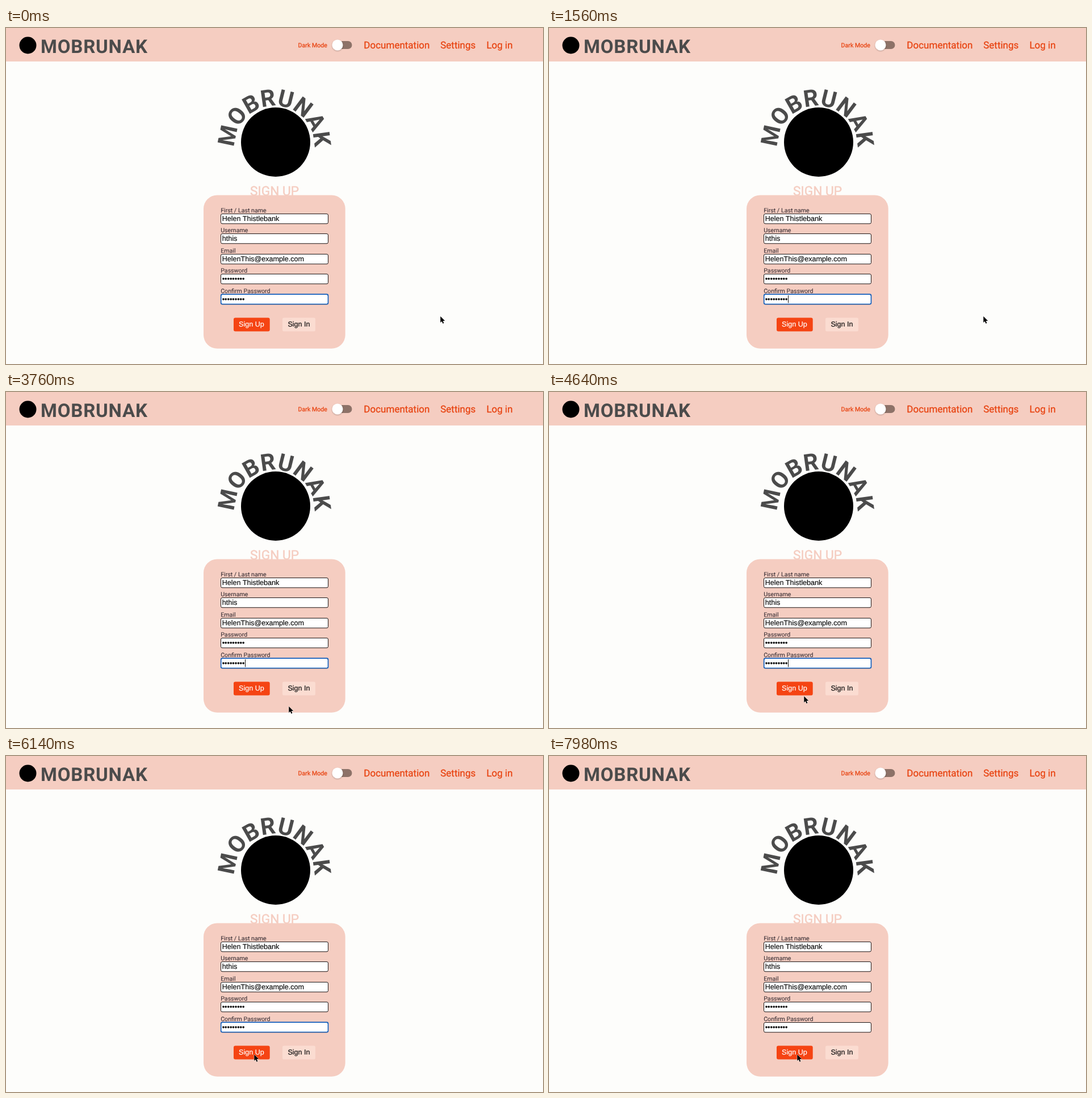
Recreate the animation shown at these times as an HTML page. Size 946x592 px, loop 8000 ms.

```html
<!DOCTYPE html>
<html lang="en">
<head>
<meta charset="utf-8">
<title>Sign up</title>
<style>
  html, body { margin: 0; width: 100%; height: 100%; overflow: hidden; background: #fdfdfb; }
  svg { display: block; width: 946px; height: 592px; font-family: Roboto, sans-serif; text-rendering: geometricPrecision; }
  .pink { fill: #f5cdc1; }
  .brand { fill: #4b4b4b; font-weight: 700; }
  .nav { fill: #e8420f; stroke: #e8420f; stroke-width: .25; font-size: 17.03px; }
  .small { font-size: 10.65px; }
  .title { stroke: #f5cdc1; stroke-width: .5; font-size: 22.7px; }
  .label { fill: #3a3036; stroke: #3a3036; stroke-width: .1; }
  .control { font: 12.6px "Liberation Sans", Arial, sans-serif; stroke-width: .2; }
  .dark { fill: #111; stroke: #111; }
  .light { fill: #fff; stroke: #fff; }
  .box { fill: #fff; stroke: #1c1616; }
</style>
</head>
<body>
<svg viewBox="0 0 946 592">
  <defs>
    <path id="arc" d="M473 277a70 70 0 1 1 .01 0"/>
    <filter id="shadow" x="-50%" y="-50%" width="200%" height="200%">
      <feDropShadow dx="0" dy="1" stdDeviation="1" flood-opacity=".3"/>
    </filter>
  </defs>

  <rect class="pink" width="946" height="59"/>
  <circle cx="38.5" cy="30.5" r="15"/>
  <text class="brand" x="61" y="43.5" font-size="33" letter-spacing=".8">MOBRUNAK</text>
  <text class="nav small" x="514.6" y="34">Dark Mode</text>
  <rect x="577" y="23" width="32.5" height="14" rx="7" fill="#8d7268"/>
  <circle cx="584" cy="30" r="9.5" fill="#fff" filter="url(#shadow)"/>
  <text class="nav" x="630.3" y="35.8">Documentation</text>
  <text class="nav" x="765.2" y="35.8">Settings</text>
  <text class="nav" x="846.4" y="35.8">Log in</text>

  <circle cx="475" cy="201" r="61"/>
  <text class="brand" font-size="41" text-anchor="middle"><textPath href="#arc" startOffset="50%">MOBRUNAK</textPath></text>

  <text class="pink title" x="473" y="294.5" text-anchor="middle">SIGN UP</text>
  <rect class="pink" x="348" y="294.5" width="249.7" height="270.3" rx="24"/>
  <g id="fields"></g>
  <rect id="focus" x="378.7" y="469.2" width="188.8" height="17.3" rx="2.5" fill="none" stroke="#1460bd" stroke-width="1.7"/>
  <path id="caret" d="M421.5 471v13.5" stroke="#111"/>

  <rect x="401" y="510.4" width="63.7" height="24.2" rx="3" fill="#f54413"/>
  <text class="control light" x="410" y="526">Sign Up</text>
  <rect x="487" y="510.4" width="58" height="24.2" rx="3" fill="#fbdcd1"/>
  <text class="control dark" x="496.4" y="526">Sign In</text>

  <g id="cursor">
    <path d="M.3 1v11l2.5-2.3 1.7 4 1.9-.8-1.7-3.9h3.5z" stroke="#fff" stroke-width="1" paint-order="stroke"/>
  </g>
</svg>
<script>
const LOOP = 8000;
const BLUR_TIME = 6900;
const BLINK = { period: 865, on: 0.32, off: 0.82 };
const rows = [
  ["First / Last name", "Helen Thistlebank"],
  ["Username", "hthis"],
  ["Email", "HelenThis@example.com"],
  ["Password", "•".repeat(9)],
  ["Confirm Password", "•".repeat(9)],
];
// time, x, y of the pointer tip
const pointerPath = [
  [2260, 765, 507], [2400, 755, 513], [2660, 698, 526], [3000, 640, 545],
  [3300, 578, 559], [3760, 498, 553], [4120, 463, 541], [4640, 449, 535],
  [5060, 446, 533], [5500, 437, 525],
];

const byId = id => document.getElementById(id);

byId("fields").innerHTML = rows.map(([label, value], i) => {
  const y = 327 + 35.4 * i;
  return `<text class="label small" x="378.2" y="${y - 2}">${label}</text>
    <rect class="box" x="378.5" y="${Math.round(y) + 0.5}" width="189" height="17.3" rx="2.5"/>
    <text class="control dark" x="380.7" y="${y + 13}">${value}</text>`;
}).join("");

function pointerAt(t) {
  const next = pointerPath.findIndex(p => p[0] > t);
  if (next === 0) return pointerPath[0].slice(1);
  if (next < 0) return pointerPath.at(-1).slice(1);
  const [t0, x0, y0] = pointerPath[next - 1];
  const [t1, x1, y1] = pointerPath[next];
  const k = (t - t0) / (t1 - t0);
  return [x0 + (x1 - x0) * k, y0 + (y1 - y0) * k];
}

function show(el, visible) {
  el.style.visibility = visible ? "visible" : "hidden";
}

function draw(t) {
  const focused = t < BLUR_TIME;
  const phase = (t / BLINK.period) % 1;
  show(byId("focus"), focused);
  show(byId("caret"), focused && phase >= BLINK.on && phase < BLINK.off);
  const [x, y] = pointerAt(t).map(Math.round);
  byId("cursor").setAttribute("transform", `translate(${x} ${y})`);
}

const start = performance.now();
function tick() {
  draw((performance.now() - start) % LOOP);
  requestAnimationFrame(tick);
}
tick();
</script>
</body>
</html>
```
